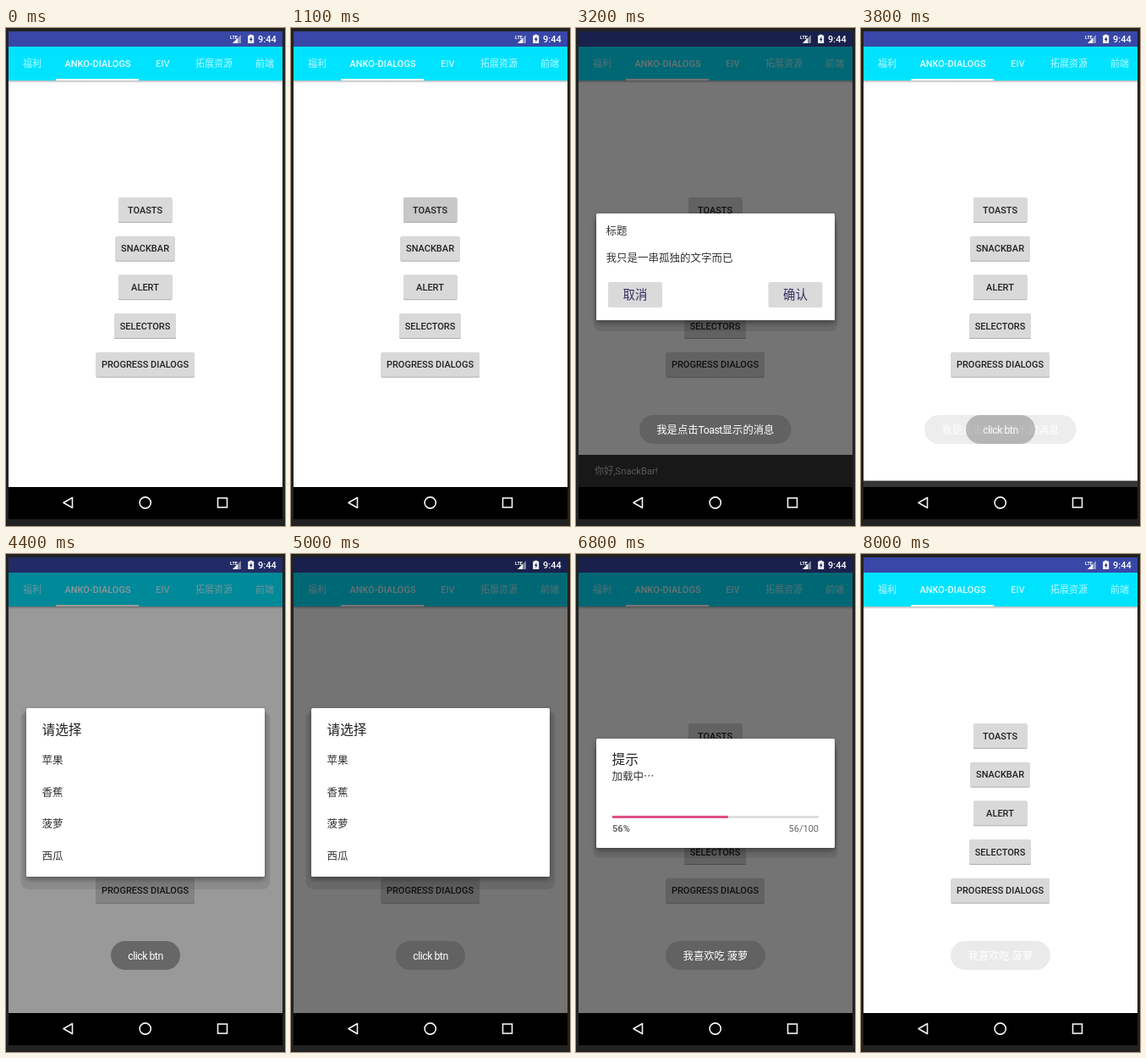
Animation, 330 px wide and 588 px high, one loop 8.1 s. Source, as an HTML page:

```html
<!DOCTYPE html>
<html lang="zh-CN">
<head>
<meta charset="utf-8">
<title>Dialogs demo</title>
<style>
@property --n { syntax: "<integer>"; inherits: true; initial-value: 0; }
html, body { margin: 0; width: 100%; height: 100%; overflow: hidden; background: #222; }
body { position: relative; }
svg { display: block; position: absolute; left: 0; top: 0; }
text, .count { font: 500 11px Roboto, "Noto Sans CJK SC", "Noto Sans CJK", sans-serif; }
.mid text, text.mid { text-anchor: middle; }

.tabs text { fill: #fff; fill-opacity: .72; }
.tabs .on { fill-opacity: .9; }
.btn rect { fill: #d9d9d9; filter: drop-shadow(0 1px .7px rgba(0,0,0,.32)); }
.btn text { fill: #222; }
.btn .press { fill: #000; filter: none; opacity: 0; }

.dialog .card { fill: #fff; filter: drop-shadow(0 3px 3px rgba(0,0,0,.38)); }
.dialog .halo { fill: #000; fill-opacity: .09; }
.dialog text { font-weight: 400; font-size: 12.5px; fill: #333; }
.dialog .head { font-size: 15.7px; fill: #222; }
.dialog .act { font-size: 14.4px; fill: #352a5c; }
.dialog .cjk { font-family: "Noto Sans CJK SC", "Noto Sans CJK", sans-serif; }

.toast rect { fill: #606060; fill-opacity: .88; }
.toast text { font-weight: 400; font-size: 12.3px; fill: #fff; }
.toast tspan { letter-spacing: -.5px; }
.snack text { font-weight: 400; font-size: 11.2px; fill: #c8c8c8; }
.nav { fill: none; stroke: #f4f4f4; stroke-width: 1.6; }

.count { position: absolute; left: 43px; top: 319px; width: 244px; line-height: 12px; color: #666; }
.count span { position: absolute; top: 0; }
.pct { left: 0; font-weight: 700; }
.of { right: 0; font-weight: 400; }
.pct::after { counter-reset: n var(--n); content: counter(n) "%"; }
.of::after { counter-reset: n var(--n); content: counter(n) "/100"; }

/* one 8.1 s loop drives everything */
.press, .dim, .alert, .select, .load, .t1, .t2, .t3, .snack, .fill {
  animation: 8.1s linear infinite;
}
.dim, .alert, .select, .load, .t1, .t2, .t3 { opacity: 0; }
.press { animation-name: press; }
.dim { animation-name: dim; }
.alert { animation-name: alert; }
.select { animation-name: select; }
.load { animation-name: load; }
.count { animation-name: load, count; }
.t1 { animation-name: t1; }
.t2 { animation-name: t2; }
.t3 { animation-name: t3; }
.snack { animation-name: snack; }
.fill { animation-name: fill; transform-origin: 43px 0; }

@keyframes press { 0%, 7.5%, 100% { opacity: 0 } 1.2%, 5.5% { opacity: .075 } }
@keyframes dim {
  0%, 32.72%, 46.3%, 51.6%, 66.05%, 75.93%, 95.06%, 100% { opacity: 0 }
  36.42%, 43.21%, 55.31%, 62.96%, 79.01%, 91.36% { opacity: .545 }
}
@keyframes alert { 0%, 32.72%, 45.06%, 100% { opacity: 0 } 35.19%, 43.21% { opacity: 1 } }
@keyframes select { 0%, 51.6%, 64.81%, 100% { opacity: 0 } 53.83%, 62.96% { opacity: 1 } }
@keyframes load { 0%, 75.93%, 93.33%, 100% { opacity: 0 } 78.15%, 91.36% { opacity: 1 } }
@keyframes t1 { 0%, 13.58%, 47.53%, 100% { opacity: 0 } 18.52%, 42.59% { opacity: 1 } }
@keyframes t2 { 0%, 44.44%, 74.57%, 100% { opacity: 0 } 50%, 69.14% { opacity: 1 } }
@keyframes t3 { 0%, 67.9%, 99.63%, 100% { opacity: 0 } 73.46%, 93.83% { opacity: 1 } }
@keyframes snack {
  0%, 22.22%, 47.53%, 100% { transform: translateY(38px); animation-timing-function: cubic-bezier(.4,0,.2,1) }
  27.16%, 44.44% { transform: none }
}
@keyframes count { 0%, 77.04% { --n: 0 } 89.38%, 100% { --n: 100 } }
@keyframes fill { 0%, 77.04% { transform: scaleX(0) } 89.38%, 100% { transform: scaleX(1) } }
</style>
</head>
<body>
<svg width="330" height="588" viewBox="0 0 330 588">
  <defs>
    <linearGradient id="shade" x2="0" y2="1">
      <stop stop-opacity=".28"/><stop offset="1" stop-opacity="0"/>
    </linearGradient>
    <clipPath id="screen"><path d="M3 4h324v576H3z"/></clipPath>
  </defs>
  <rect width="330" height="588" fill="#222"/>
  <g clip-path="url(#screen)">
    <rect x="3" y="4" width="324" height="538" fill="#fff"/>
    <rect x="3" y="4" width="324" height="18" fill="#3847a8"/>
    <rect x="3" y="22" width="324" height="40" fill="#00e3ff"/>
    <rect x="3" y="62" width="324" height="3" fill="url(#shade)"/>
    <rect x="59" y="60" width="98" height="2" fill="#fff"/>
    <g class="tabs mid">
      <text x="31" y="46">福利</text>
      <text x="108.5" y="46" class="on">ANKO-DIALOGS</text>
      <text x="185.5" y="46">EIV</text>
      <text x="246" y="46">拓展资源</text>
      <text x="306" y="46">前端</text>
    </g>

    <g class="btn mid">
      <rect x="133" y="200" width="63.5" height="29" rx="1.5"/>
      <rect class="press" style="animation-delay:.8s" x="133" y="200" width="63.5" height="29" rx="1.5"/>
      <text x="164.5" y="218.5">TOASTS</text>
      <rect x="129.5" y="245.7" width="70" height="29" rx="1.5"/>
      <rect class="press" style="animation-delay:1.75s" x="129.5" y="245.7" width="70" height="29" rx="1.5"/>
      <text x="164.5" y="264.2">SNACKBAR</text>
      <rect x="133" y="291.3" width="63.5" height="29" rx="1.5"/>
      <rect class="press" style="animation-delay:2.4s" x="133" y="291.3" width="63.5" height="29" rx="1.5"/>
      <text x="164.5" y="309.8">ALERT</text>
      <rect x="128" y="337" width="73" height="29" rx="1.5"/>
      <rect class="press" style="animation-delay:3.95s" x="128" y="337" width="73" height="29" rx="1.5"/>
      <text x="164.5" y="355.5">SELECTORS</text>
      <rect x="106.5" y="382.7" width="116.5" height="29" rx="1.5"/>
      <rect class="press" style="animation-delay:5.9s" x="106.5" y="382.7" width="116.5" height="29" rx="1.5"/>
      <text x="164.5" y="401.2">PROGRESS DIALOGS</text>
    </g>

    <g class="snack" transform="translate(0 38)">
      <rect x="3" y="504" width="324" height="38" fill="#353535"/>
      <text x="22" y="527.3">你好,SnackBar!</text>
    </g>

    <rect class="dim" x="3" y="4" width="324" height="538"/>

    <!-- status icons -->
    <g fill="#fff">
      <text x="265" y="13" style="font-size:5.5px;font-weight:700">LTE</text>
      <path d="M278 8v10h-10z" fill-opacity=".45"/>
      <path d="M274 12v6h-6z"/>
      <path d="M288 8.8v-1h3.4v1h1.8V18h-7V8.8z"/>
      <path d="M290.4 10l-2.6 4h1.6v2.8l2.4-4h-1.4z" fill="#26306f"/>
      <text x="298" y="17">9:44</text>
    </g>

    <g class="dialog alert">
      <rect class="halo" x="21" y="226" width="288" height="132" rx="7"/>
      <rect class="card" x="24" y="219" width="282" height="126" rx="1.5"/>
      <text x="35.5" y="243.7">标题</text>
      <text x="35.5" y="276">我只是一串孤独的文字而已</text>
      <g fill="#dadada">
        <rect x="38" y="300" width="64" height="30" rx="2"/>
        <rect x="227.5" y="300" width="64" height="30" rx="2"/>
      </g>
      <text class="act mid" x="70" y="320.3">取消</text>
      <text class="act mid" x="259.5" y="320.3">确认</text>
    </g>

    <g class="dialog select">
      <rect class="halo" x="17.5" y="186" width="295" height="210" rx="9"/>
      <rect class="card" x="24" y="182" width="282" height="199" rx="1.5"/>
      <text class="head" x="42.5" y="213">请选择</text>
      <text x="42.5" y="247.7">苹果</text>
      <text x="42.5" y="285.5">香蕉</text>
      <text x="42.5" y="323.2">菠萝</text>
      <text x="42.5" y="360.9">西瓜</text>
    </g>

    <g class="dialog load">
      <rect class="halo" x="21" y="226" width="288" height="133" rx="7"/>
      <rect class="card" x="24" y="218" width="282" height="129" rx="1.5"/>
      <text class="head" x="42.5" y="248">提示</text>
      <text class="cjk" x="42.5" y="266.5">加载中…</text>
      <rect x="43" y="309" width="244" height="3" fill="#dedede"/>
      <rect class="fill" x="43" y="309" width="244" height="3" fill="#e05085"/>
    </g>

    <g class="toast mid">
      <g class="t1">
        <rect x="75" y="457" width="179.5" height="34" rx="17"/>
        <text x="164.8" y="478.7">我是点击<tspan>Toast</tspan>显示的消息</text>
      </g>
      <g class="t2">
        <rect x="124" y="457" width="82" height="34" rx="17"/>
        <text x="165" y="478.5"><tspan>click btn</tspan></text>
      </g>
      <g class="t3">
        <rect x="106" y="457" width="118" height="34" rx="17"/>
        <text x="165" y="478.7">我喜欢吃 菠萝</text>
      </g>
    </g>

    <rect x="3" y="542" width="324" height="38"/>
    <g class="nav">
      <path d="M78.5 554.5v12l-10.5-6z" stroke-linejoin="round"/>
      <circle cx="164.7" cy="560.5" r="6.6"/>
      <rect x="250.5" y="555" width="11" height="11"/>
    </g>
  </g>
</svg>
<div class="count load"><span class="pct"></span><span class="of"></span></div>
</body>
</html>
```
